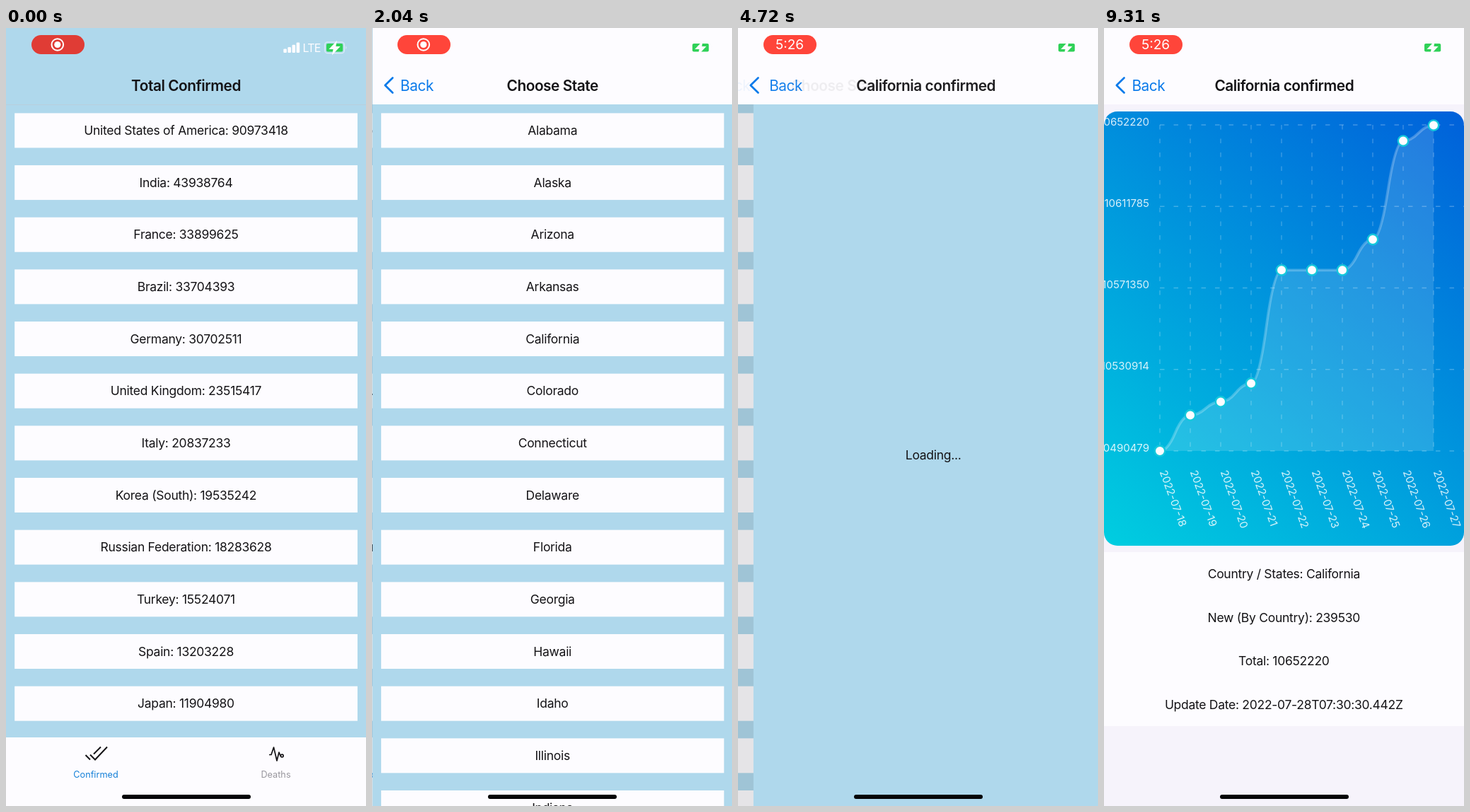
An HTML page for the animation above (9.36 s loop, 509 by 1100 pixels).

```html
<!DOCTYPE html>
<html lang="en">
<head>
<meta charset="utf-8">
<title>Case counts</title>
<style>
  html, body { margin: 0; width: 100%; height: 100%; overflow: hidden; background: #afd8ec; }
  svg { display: block; width: 100%; height: 100%; }
  text { font-family: Inter, Roboto, sans-serif; fill: #141316; }
  .row { font-size: 17.5px; letter-spacing: -.28px; text-anchor: middle; }
  .head { font-size: 20.8px; letter-spacing: -.45px; font-weight: 600; text-anchor: middle; }
  .back { font-size: 20.8px; letter-spacing: -.45px; fill: #0a7aea; }
  .tab { font-size: 12.7px; text-anchor: middle; }
  .axis { font-size: 15px; fill: #fff; fill-opacity: .85; }
</style>
</head>
<body>
<svg id="stage" viewBox="0 0 509 1100" preserveAspectRatio="none">
  <defs>
    <linearGradient id="sea" gradientUnits="userSpaceOnUse" x1="0" y1="732" x2="509" y2="118">
      <stop offset="0" stop-color="#00cee0"/>
      <stop offset="1" stop-color="#0060da"/>
    </linearGradient>
  </defs>

  <g id="home">
    <rect width="509" height="1100" fill="#afd8ec"/>
    <path d="M0 108.5H509" stroke="#b9cfdd"/>
    <text class="head" x="254.5" y="88.6">Total Confirmed</text>
    <g id="countries"></g>
    <rect y="1003" width="509" height="97" fill="#fdfcff"/>
    <g fill="none" stroke="#141316" stroke-width="2">
      <path d="M112.5 1028l6.5 6.5M124 1026.5l10-10M119 1027.5l7 7 17-18"/>
      <path d="M372 1027.5h3l3.5-10.5 4.5 19 3-12 2 5h1" stroke-width="1.7" stroke-linejoin="round"/>
      <circle cx="390.3" cy="1029" r="1.9" stroke-width="1.6"/>
    </g>
    <text class="tab" x="127" y="1060" style="fill:#1580d8">Confirmed</text>
    <text class="tab" x="381.5" y="1060" style="fill:#98979d">Deaths</text>
    <rect id="homeDim" width="509" height="1100"/>
  </g>

  <g id="nav">
    <g id="list">
      <rect width="509" height="1100" fill="#afd8ec"/>
      <g id="states"></g>
      <rect id="listDim" width="509" height="1100"/>
    </g>
    <g id="detail">
      <rect width="509" height="1100" fill="#afd8ec"/>
      <text id="loading" class="row" x="254.3" y="610">Loading...</text>
      <g id="report">
        <rect width="509" height="1100" fill="#f6f3fb"/>
        <rect y="118" width="509" height="614" rx="19" fill="url(#sea)"/>
        <g id="chart"></g>
        <rect y="741" width="509" height="246" fill="#fdfcff"/>
        <g id="facts"></g>
      </g>
    </g>
    <rect width="509" height="108" fill="#fdfcff"/>
    <text id="oldBack" class="back" y="88.6">Back</text>
    <text id="newBack" class="back" y="88.6">Back</text>
    <text id="oldTitle" class="head" y="88.6">Choose State</text>
    <text id="newTitle" class="head" y="88.6">California confirmed</text>
    <path d="M28.5 70.5L17.8 81l10.7 10.5" fill="none" stroke="#0a7aea" stroke-width="2.7" stroke-linecap="round" stroke-linejoin="round"/>
  </g>

  <g fill="#fdfcff">
    <rect x="392.3" y="29.5" width="4.6" height="5.5" rx="1.2"/>
    <rect x="398.4" y="27" width="4.6" height="8" rx="1.2"/>
    <rect x="404.5" y="23.8" width="4.6" height="11.2" rx="1.2"/>
    <rect x="410.6" y="20.5" width="4.6" height="14.5" rx="1.2"/>
    <text x="419.6" y="34.3" font-size="16" letter-spacing="-.9" style="fill:#fdfcff">LTE</text>
    <rect x="450.8" y="19.8" width="27.6" height="15.9" rx="4" fill="none" stroke="#fdfcff" stroke-opacity=".6" stroke-width="1.3"/>
    <path d="M480.3 25.5q2.4 2.2 0 4.6z" fill-opacity=".6"/>
    <rect x="453" y="22" width="23.2" height="11.5" rx="2" fill="#30d158"/>
    <path d="M466.5 20.5l-8 8.6h5.2l-1.3 6.6 8.2-8.8h-5.3z" stroke="#fdfcff" stroke-width="1.8"/>
  </g>

  <rect id="pill" x="36" y="10" width="75" height="27" rx="13.5"/>
  <g id="record">
    <circle cx="72.8" cy="23.5" r="8.3" fill="none" stroke="#fff" stroke-width="2"/>
    <circle cx="72.8" cy="23.5" r="4.6" fill="#fff"/>
  </g>
  <text id="clock" x="73" y="30.3" font-size="19" text-anchor="middle" style="fill:#fff">5:26</text>
  <rect x="164" y="1084" width="182" height="6" rx="3" fill="#050507"/>
</svg>

<script>
const LOOP = 9360, W = 509, PITCH = 73.66;
const $ = id => document.getElementById(id);
const clamp = v => Math.max(0, Math.min(1, v));

function add(parent, tag, attrs, text) {
  const el = document.createElementNS('http://www.w3.org/2000/svg', tag);
  for (const k in attrs) el.setAttribute(k, attrs[k]);
  if (text) el.textContent = text;
  return parent.appendChild(el);
}

function addRows(parent, labels) {
  return labels.map((label, i) => {
    const g = add(parent, 'g', {}), y = 120.4 + i * PITCH;
    add(g, 'rect', { x: 12.2, y, width: 484.8, height: 49, fill: '#fdfcff' });
    add(g, 'text', { class: 'row', x: 254.5, y: y + 30.6 }, label);
    return g;
  });
}

const countryRows = addRows($('countries'), [
  'United States of America: 90973418', 'India: 43938764', 'France: 33899625',
  'Brazil: 33704393', 'Germany: 30702511', 'United Kingdom: 23515417',
  'Italy: 20837233', 'Korea (South): 19535242', 'Russian Federation: 18283628',
  'Turkey: 15524071', 'Spain: 13203228', 'Japan: 11904980']);

const stateRows = addRows($('states'), [
  'Alabama', 'Alaska', 'Arizona', 'Arkansas', 'California', 'Colorado', 'Connecticut',
  'Delaware', 'Florida', 'Georgia', 'Hawaii', 'Idaho', 'Illinois', 'Indiana']);

// Pressed look of the first country
const pressed = add($('countries'), 'g', {});
add(pressed, 'rect', { y: 108.2, width: W, height: PITCH, fill: '#dfe2ec' });
const pressedRow = pressed.appendChild(countryRows[0].cloneNode(true));
pressedRow.firstChild.setAttribute('fill', '#f2eff7');
pressedRow.lastChild.style.fill = '#aaa6af';

['Country / States: California', 'New (By Country): 239530', 'Total: 10652220',
 'Update Date: 2022-07-28T07:30:30.442Z'].forEach((s, i) =>
  add($('facts'), 'text', { class: 'row', x: 254.3, y: 778.3 + i * 61.4 }, s));

function drawChart() {
  const g = $('chart'), base = 598, top = 137;
  const ys = [598, 547.5, 528.5, 502.5, 342.3, 342.3, 342.3, 299, 159.6, 137.6];
  const pts = ys.map((y, i) => [79 + i * 43, y]);
  const grid = d => add(g, 'path', { d, stroke: '#fff', 'stroke-opacity': .25, 'stroke-width': 1.3, 'stroke-dasharray': '6.5 13' });

  [10652220, 10611785, 10571350, 10530914, 10490479].forEach((n, i) => {
    const y = top + i * (base - top) / 4;
    grid(`M79 ${y}H${W}`);
    add(g, 'text', { class: 'axis', x: 64, y: y + .7, 'text-anchor': 'end' }, String(n));
  });
  pts.forEach(([x], i) => {
    grid(`M${x} ${top}V${base}`);
    add(g, 'text', { class: 'axis', transform: `translate(${x - .5} 627.5) rotate(70)` }, '2022-07-' + (18 + i));
  });

  let line = `M${pts[0]}`;
  for (let i = 0; i < pts.length - 1; i++) {
    const [x0, y0] = pts[i], [x1, y1] = pts[i + 1];
    const mx = (x0 + x1) / 2, my = (y0 + y1) / 2;
    line += `Q${(x0 + mx) / 2} ${y0} ${mx} ${my}Q${(mx + x1) / 2} ${y1} ${x1} ${y1}`;
  }
  add(g, 'path', { d: `${line}V${base}H79Z`, fill: '#fff', 'fill-opacity': .14 });
  add(g, 'path', { d: line, fill: 'none', stroke: '#fff', 'stroke-opacity': .24, 'stroke-width': 3.8 });
  for (const [cx, cy] of pts)
    add(g, 'circle', { cx, cy, r: 7.2, fill: '#fdfcff', stroke: '#14c8dc', 'stroke-width': 2.4 });
}
drawChart();

// Critically damped spring: share of the way still to go
function remaining(ms) {
  const k = 6.5 * Math.max(0, ms) / 1000;
  return (1 + k) * Math.exp(-k);
}

function ease(v) {
  v = clamp(v);
  return v < .5 ? 2 * v * v : 1 - 2 * (1 - v) * (1 - v);
}

const move = (id, x) => $(id).setAttribute('transform', `translate(${x} 0)`);
const show = (el, on) => el.setAttribute('display', on ? 'inline' : 'none');

function place(id, x, alpha) {
  $(id).setAttribute('x', x);
  $(id).setAttribute('opacity', alpha);
}

function draw(t) {
  const r1 = remaining(t - 674), p1 = 1 - r1;
  move('home', -.3 * W * p1);
  $('homeDim').setAttribute('opacity', .1 * p1);
  move('nav', W * r1);
  show(pressed, t >= 560 && t < 1000);

  const r2 = remaining(t - 3963), p2 = 1 - r2;
  move('list', -.3 * W * p2);
  $('listDim').setAttribute('opacity', .1 * p2);
  move('detail', W * r2);
  const tap = ease((t - 3700) / 150) - ease((t - 4060) / 250);
  stateRows[4].setAttribute('opacity', 1 - .8 * tap);

  const lag = Math.pow(r2, 1.147);
  const fadeOut = 1 - Math.pow(p2, 1.4), fadeIn = Math.pow(p2, 1.2);
  place('oldTitle', 254.5 - 120 * p2, fadeOut);
  place('oldBack', 39.4 - 72 * p2, fadeOut);
  place('newTitle', 254.8 + 404 * lag, fadeIn);
  place('newBack', 39.4 + 178 * lag, fadeIn);

  show($('loading'), t < 7400);
  show($('report'), t >= 7400);

  const glow = Math.min(1, .75 * (1 - Math.cos(2 * Math.PI * t / 3455)));
  const mix = (a, b) => Math.round(a + (b - a) * glow);
  $('pill').setAttribute('fill', `rgb(${mix(224, 255)},${mix(60, 69)},${mix(53, 58)})`);
  show($('record'), t < 3000);
  show($('clock'), t >= 3000);
}

const start = performance.now();
function tick() {
  draw((performance.now() - start) % LOOP);
  requestAnimationFrame(tick);
}
tick();
</script>
</body>
</html>
```
